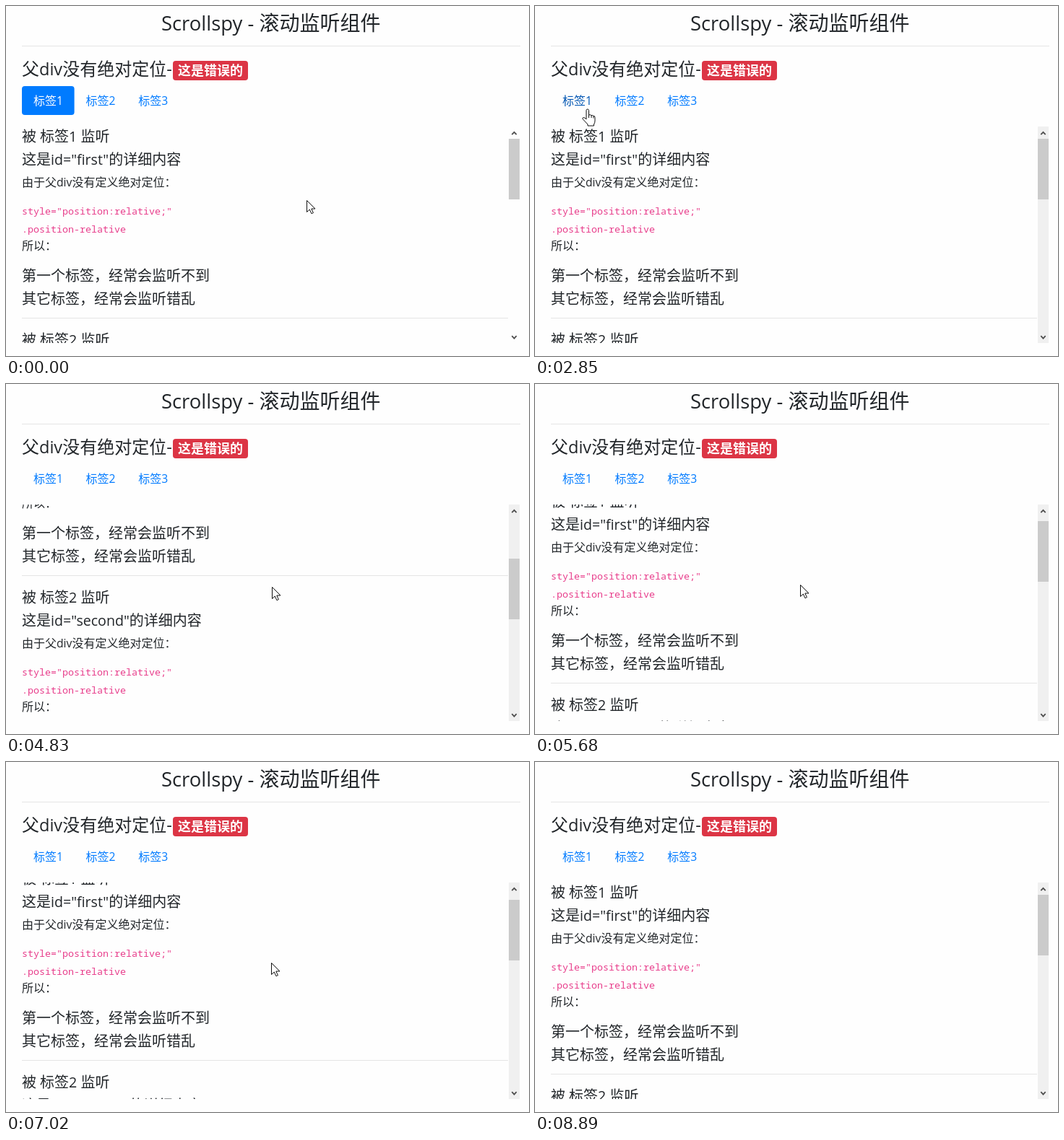
An HTML page for the animation above (9.04 s loop, 724 px wide and 485 px high).

```html
<!DOCTYPE html>
<html lang="zh">
<head>
<meta charset="utf-8">
<title>Scrollspy</title>
<style>
  html, body { margin: 0; width: 100%; height: 100%; overflow: hidden; background: #fefefe; }
  svg { display: block; font-family: "Open Sans", "Noto Sans CJK SC", "Noto Sans CJK", sans-serif; fill: #212529; }
  text { white-space: pre; }
  .latin { font-size: .98em; }
  .code { font-family: "Noto Sans Mono", "DejaVu Sans Mono", monospace; fill: #e83e8c; }
  .rule { fill: #e5e5e5; }
  .chevron { fill: none; stroke: #505050; stroke-width: 1.8; }
</style>
</head>
<body>
<svg id="stage" width="724" height="485" viewBox="0 0 724 485"></svg>
<script>
const LOOP = 9040, STEP = 130, LEAD = 45;
const MAX_SCROLL = 521, SECTION = 282, TAB_WIDTH = 72.6;
const FIRST_SCROLL = 560, POINTER_GONE = 8890;

// Full-height scrolls, alternately down and up.
const sweeps = [
  { start: FIRST_SCROLL, span: 640 }, { start: 1350, span: 640 },
  { start: 3350, span: 640 }, { start: 4570, span: 445 },
  { start: 5560, span: 360 }, { start: 6220, span: 240 },
  { start: 7020, span: 348 }, { start: 7540, span: 390 }
];
const home = { x: 416, y: 269 };
const moves = [
  { start: 2000, span: 700, x: 70, y: 143 },
  { start: 2900, span: 400, x: 368, y: 281 },
  { start: 5130, span: 430, x: 367, y: 278 },
  { start: 8000, span: 760, x: 684, y: 472 }
];

const text = (x, y, size, str, attrs = "") => {
  const runs = str.replace(/[\x20-\x7e]+/g, run => `<tspan class="latin">${run}</tspan>`);
  return `<text x="${x}" y="${y}" font-size="${size}" ${attrs}>${runs}</text>`;
};
const code = (y, str) => `<text class="code" x="22" y="${y}" font-size="13.33">${str}</text>`;
const rect = (x, y, w, h, attrs = "") => `<rect x="${x}" y="${y}" width="${w}" height="${h}" ${attrs}/>`;

const section = (id, i) => `<g transform="translate(0 ${i * SECTION})">
  ${text(22, 188, 20, `被 标签${i + 1} 监听`)}
  ${text(22, 220, 20, `这是id="${id}"的详细内容`)}
  ${text(22, 250, 16, "由于父div没有定义绝对定位：")}
  ${code(289, 'style="position:relative;"')}
  ${code(314, ".position-relative")}
  ${text(22, 338, 16, "所以：")}
  ${text(22, 381, 20, "第一个标签，经常会监听不到")}
  ${text(22, 413, 20, "其它标签，经常会监听错乱")}
  ${i < 2 ? rect(22, 432, 673, 1, 'class="rule"') : ""}
</g>`;

const tab = i => `<g class="tab">
  ${rect(22 + i * TAB_WIDTH, 111, TAB_WIDTH, 40, 'rx="4" fill="#007bff"')}
  ${text(38 + i * TAB_WIDTH, 137, 16, `标签${i + 1}`)}
</g>`;

document.getElementById("stage").innerHTML = `
  <clipPath id="view">${rect(0, 167, 695, 300)}</clipPath>
  ${text(215, 34, 28, "Scrollspy - 滚动监听组件")}
  ${rect(22, 55, 690, 1, 'class="rule"')}
  ${text(22, 96, 24, "父div没有绝对定位-")}
  ${rect(231, 76, 104, 27, 'rx="4" fill="#dc3545"')}
  ${text(238, 96, 18, "这是错误的", 'font-weight="700" fill="#fff"')}
  ${[0, 1, 2].map(tab).join("")}
  <g clip-path="url(#view)"><g id="content">${["first", "second", "third"].map(section).join("")}</g></g>
  ${rect(696, 167, 15, 300, 'id="track"')}
  ${rect(696, 184, 15, 84, 'id="thumb" fill="#cbcbcb"')}
  <path class="chevron" d="M700.3 178.2l3.2-3.4 3.2 3.4M700.3 457.2l3.2 3.4 3.2-3.4"/>
  <g id="pointer" fill="#fff" stroke="#111" stroke-linejoin="round">
    <path id="arrow" d="M.5 .5V16.5L4.3 13L6.9 18.7L9.4 17.6L6.8 12H12Z"/>
    <path id="hand" d="M1 14V1.5Q1 0 2.7 0T4.5 1.5V8Q7 7 8 8.7Q10 8 11 9.5Q13 9 13 11.5V16Q13 19 11.5 21V23H3V21L-4 13.5Q-4.5 11.5-2.5 11.5Q-1 11.5 1 14ZM4.5 8V12M8 8.7V12M11 9.5V12.5"/>
  </g>`;

const [content, track, thumb, pointer, arrow, hand] =
  ["content", "track", "thumb", "pointer", "arrow", "hand"].map(id => document.getElementById(id));
const tabs = [...document.querySelectorAll(".tab")].map(g => ({
  pill: g.querySelector("rect"), label: g.querySelector("text")
}));

const clamp = k => Math.min(1, Math.max(0, k));
const smooth = k => k * k * (3 - 2 * k);
const show = (el, on) => el.setAttribute("visibility", on ? "visible" : "hidden");

// The screen refreshes in steps, counted from the start of the latest sweep.
function refreshTime(time) {
  const start = sweeps.reduce((last, s) => s.start <= time ? s.start : last, 0);
  return start + Math.floor((time - start) / STEP) * STEP;
}

function scrollAt(time) {
  const started = sweeps.filter(s => s.start <= time);
  if (!started.length) return 0;
  const { start, span } = started[started.length - 1];
  const k = smooth(clamp((time - start + LEAD) / (span + LEAD)));
  return Math.round(MAX_SCROLL * (started.length % 2 ? k : 1 - k));
}

function pointerAt(time) {
  return moves.reduce((p, m) => {
    const k = clamp((time - m.start) / m.span);
    return { x: Math.round(p.x + (m.x - p.x) * k), y: Math.round(p.y + (m.y - p.y) * k) };
  }, home);
}

function activeTab(time, scroll) {
  if (time < FIRST_SCROLL) return 0;
  if (scroll >= MAX_SCROLL) return 2;
  return Math.floor((scroll + SECTION - 170) / SECTION) - 1;
}

function render(now) {
  const time = now % LOOP, shown = refreshTime(time);
  const scroll = scrollAt(shown);
  const { x, y } = pointerAt(shown);
  const active = activeTab(time, scroll);
  const hovered = y >= 111 && y < 151 ? Math.floor((x - 22) / TAB_WIDTH) : -1;
  const onTab = hovered >= 0 && hovered < tabs.length;
  const present = time < POINTER_GONE;

  content.setAttribute("transform", `translate(0 ${-scroll})`);
  thumb.setAttribute("y", 184 + Math.round(scroll / MAX_SCROLL * 182));
  track.setAttribute("fill", time < FIRST_SCROLL ? "#fefefe" : "#f0f0f0");
  tabs.forEach(({ pill, label }, i) => {
    show(pill, i === active);
    label.setAttribute("fill", i === active ? "#fff" : i === hovered ? "#0056b3" : "#007bff");
  });
  pointer.setAttribute("transform", `translate(${x} ${y})`);
  show(arrow, present && !onTab);
  show(hand, present && onTab);
}

const begin = performance.now();
function loop() {
  render(performance.now() - begin);
  requestAnimationFrame(loop);
}
loop();
</script>
</body>
</html>
```
